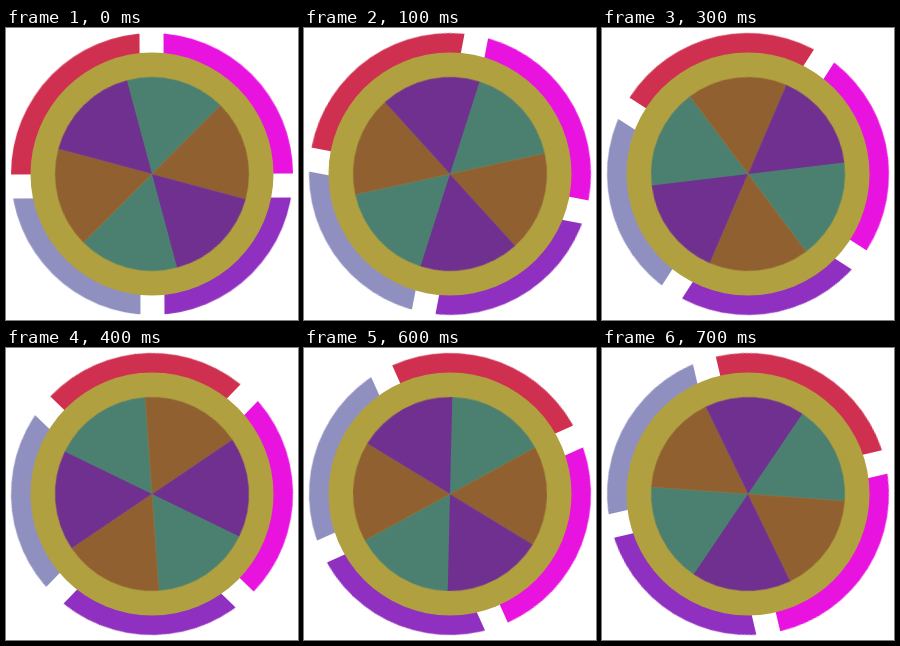
An HTML page for the animation above (0.8 s loop, 292 by 292 pixels).

```html
<!DOCTYPE html>
<html lang="en">
<head>
<meta charset="utf-8">
<title>Wheel</title>
<style>
html, body { margin: 0; width: 100%; height: 100%; overflow: hidden; background: #fff; }
svg { display: block; width: 100vw; height: 100vh; }
</style>
</head>
<body>
<svg viewBox="-146 -146 292 292">
  <clipPath id="disc"><circle r="141"/></clipPath>
  <g id="rim">
    <g clip-path="url(#disc)">
      <rect x="-150" y="-150" width="138" height="150" fill="#d03050"/>
      <rect x="12" y="-150" width="138" height="150" fill="#e913e0"/>
      <rect x="-150" y="24" width="138" height="126" fill="#9090c0"/>
      <rect x="12" y="24" width="138" height="126" fill="#9030c0"/>
    </g>
  </g>
  <circle r="121.5" fill="#b0a040"/>
  <g id="wheel"></g>
</svg>
<script>
const LOOP = 800, STEPS = 8, R = 97;
const rim = document.getElementById('rim');
const wheel = document.getElementById('wheel');
const colors = ['#4b8070', '#906030', '#703090'];

// Point on the wheel's edge, in degrees clockwise from the top
const edge = deg => {
  const a = deg * Math.PI / 180;
  return `${R * Math.sin(a)} ${-R * Math.cos(a)}`;
};

for (let i = 0; i < 6; i++) {
  const slice = document.createElementNS('http://www.w3.org/2000/svg', 'path');
  slice.setAttribute('d', `M0 0L${edge(i * 60)}A${R} ${R} 0 0 1 ${edge(i * 60 + 60)}Z`);
  slice.setAttribute('fill', colors[i % 3]);
  wheel.append(slice);
}

function spin(el, start, step) {
  const turn = deg => ({ transform: `rotate(${deg}deg)` });
  el.animate([turn(start), turn(start + step * STEPS)],
    { duration: LOOP, iterations: Infinity, easing: `steps(${STEPS}, end)` });
}

spin(rim, -0.2, 11);
spin(wheel, -15, 360 / 11);
</script>
</body>
</html>
```
